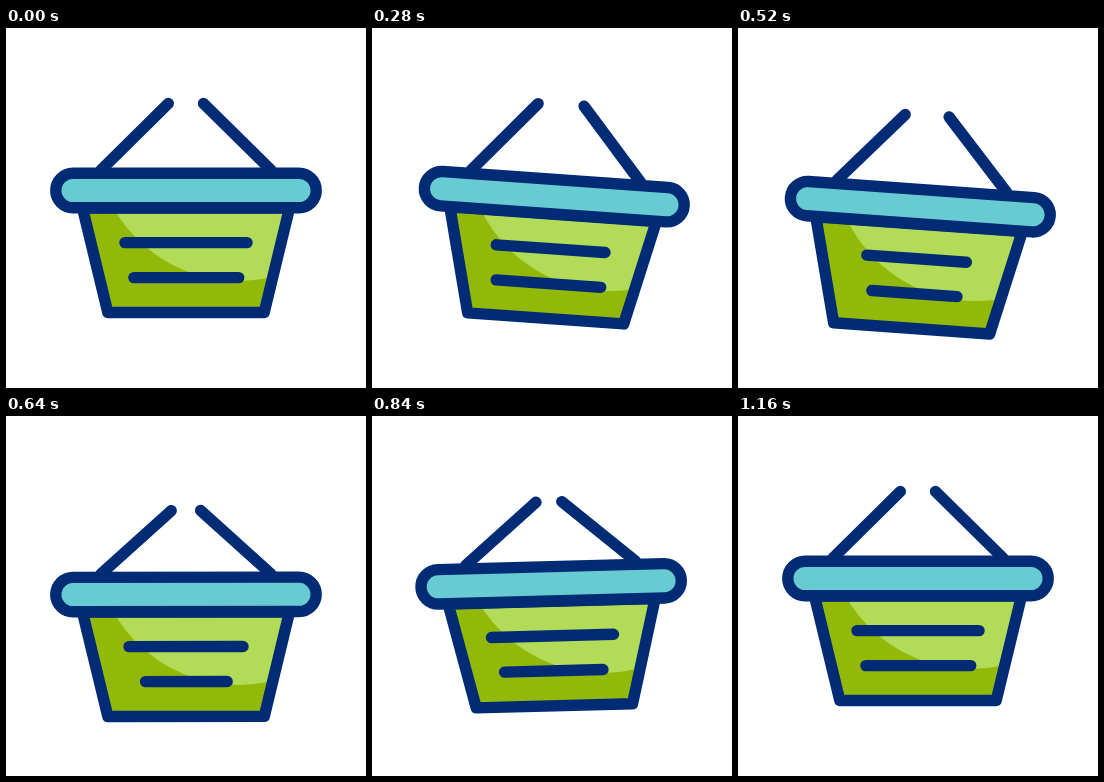
Write an HTML page with a canvas that moves like this. It is 360x360 px and loops after 1.2 s.

```html
<!DOCTYPE html>
<html lang="en">
<head>
<meta charset="utf-8">
<title>Swinging basket</title>
<style>
  html, body { margin: 0; width: 100%; height: 100%; overflow: hidden; background: #fff; }
  canvas { display: block; width: 100vmin; height: 100vmin; }
</style>
</head>
<body>
<canvas id="stage"></canvas>
<script>
const SIZE = 360, LOOP = 1200, STEP = 40;
const NAVY = '#012c75', TEAL = '#68cbd2', LIGHT = '#b2db57', GREEN = '#93b908';
const PIVOT = { x: 180, y: 195 };

const canvas = document.getElementById('stage');
const ctx = canvas.getContext('2d');

const rad = deg => deg * Math.PI / 180;
const ease = p => (1 - Math.cos(Math.PI * p)) / 2;

// Eased track through [time, value] keys.
function track(t, keys) {
  if (t <= keys[0][0]) return keys[0][1];
  for (let i = 1; i < keys.length; i++) {
    const [t0, v0] = keys[i - 1], [t1, v1] = keys[i];
    if (t < t1) return v0 + (v1 - v0) * ease((t - t0) / (t1 - t0));
  }
  return keys[keys.length - 1][1];
}

const swing = (t, peak, back) => track(t, [[100, 0], [400, peak], [753, back], [1030, 0]]);
const drop = t => track(t, [[115, 0], [505, 16.1], [620, 16.1], [980, 0]]);
const shrink = (t, start, end, amount) =>
  track(t, [[start, 0], [(start + end) / 2, amount], [end, 0]]);

function turn(x, y, deg) {
  ctx.translate(x, y);
  ctx.rotate(rad(deg));
  ctx.translate(-x, -y);
}

function line(x0, y0, x1, y1) {
  ctx.beginPath();
  ctx.moveTo(x0, y0);
  ctx.lineTo(x1, y1);
  ctx.stroke();
}

function handle(x, tipX, deg) {
  ctx.save();
  turn(x, 142, deg);
  line(x, 142, tipX, 75.5);
  ctx.restore();
}

function body() {
  const path = new Path2D('M76.5 180 L101.8 284.5 H258.2 L283.5 180 Z');
  ctx.fillStyle = GREEN;
  ctx.fill(path);
  ctx.save();
  ctx.clip(path);
  ctx.fillStyle = LIGHT;
  ctx.beginPath();
  ctx.arc(232.7, 109, 144, 0, 2 * Math.PI);
  ctx.fill();
  ctx.restore();
  ctx.stroke(path);
}

function rim() {
  ctx.beginPath();
  ctx.arc(67, 162.5, 17.2, rad(90), rad(270));
  ctx.arc(293, 162.5, 17.2, rad(-90), rad(90));
  ctx.closePath();
  ctx.fillStyle = TEAL;
  ctx.fill();
  ctx.stroke();
}

function slot(cx, y, length) {
  line(cx - length / 2, y, cx + length / 2, y);
}

function draw(t) {
  const scale = canvas.width / SIZE;
  ctx.setTransform(scale, 0, 0, scale, 0, 0);
  ctx.fillStyle = '#fff';
  ctx.fillRect(0, 0, SIZE, SIZE);
  ctx.strokeStyle = NAVY;
  ctx.lineWidth = 11.4;
  ctx.lineCap = ctx.lineJoin = 'round';

  ctx.translate(0, drop(t));
  turn(PIVOT.x, PIVOT.y, swing(t, 6.2, -1.95));
  handle(95, 162.3, swing(t, -6.4, 5.4));
  handle(265, 197.5, swing(t, 7.3, -5.4));
  body();
  slot(180, 214.6, 122 - shrink(t, 120, 760, 26));
  slot(180.3, 249.6, 104.8 - shrink(t, 270, 960, 23.5));
  rim();
}

function resize() {
  const side = Math.min(innerWidth, innerHeight) * (window.devicePixelRatio || 1);
  canvas.width = canvas.height = Math.max(1, Math.round(side));
}

const start = performance.now();
function tick() {
  const t = (performance.now() - start) % LOOP;
  draw(Math.floor(t / STEP) * STEP);
  requestAnimationFrame(tick);
}

addEventListener('resize', resize);
resize();
tick();
</script>
</body>
</html>
```
